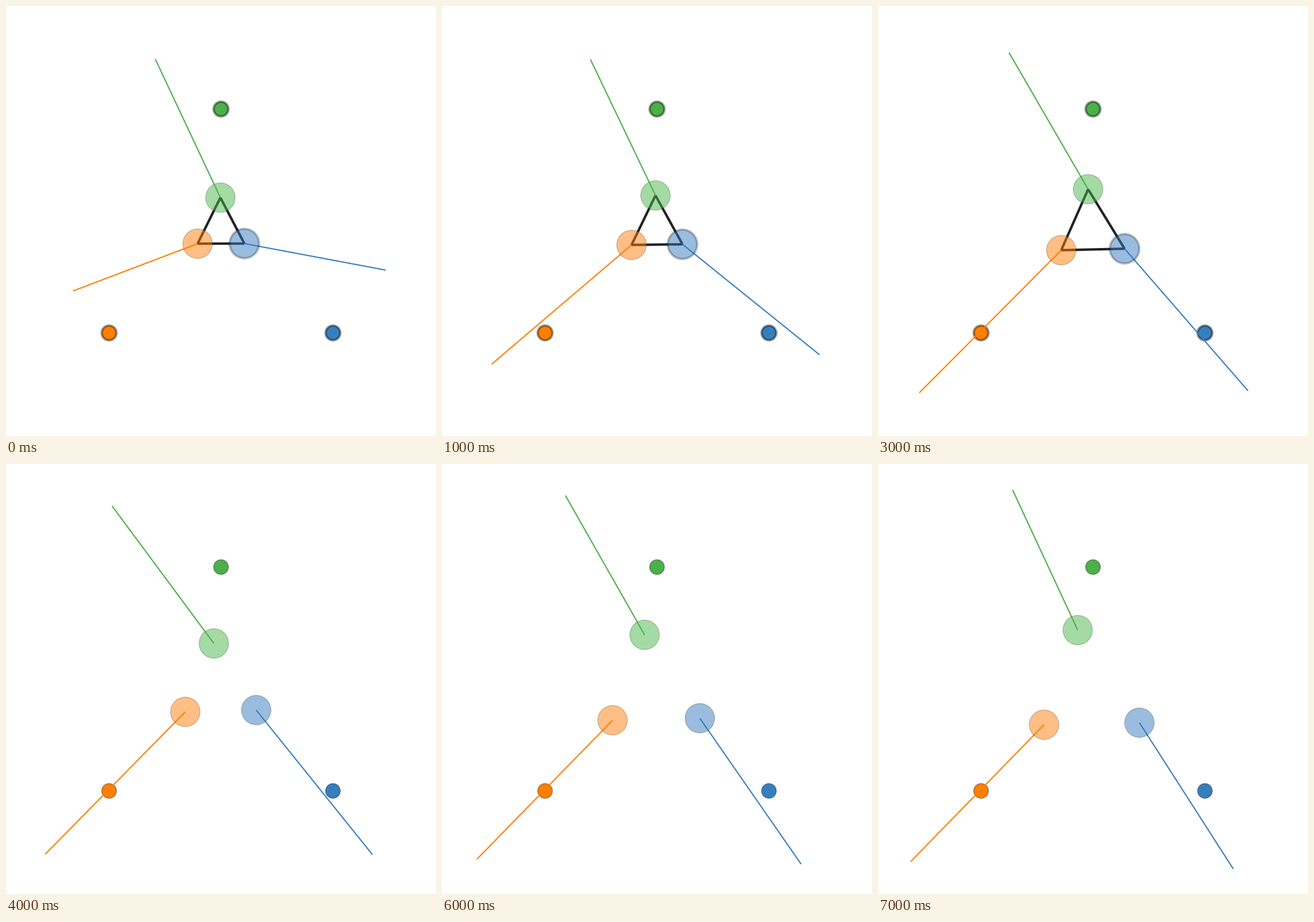
A matplotlib script for the animation above (8 s loop, 700 by 700 pixels).

```python
import matplotlib.pyplot as plt
import numpy as np
from matplotlib.animation import FuncAnimation
from matplotlib.colors import to_rgba
from matplotlib.patches import Circle

SIZE = 700
PX = 0.72  # points per pixel at 100 dpi
STEPS = 8
PLAIN = {4, 6, 7}  # steps without the triangle and the bold rims

# Listed in the order green, orange, blue
COLORS = ["#4bb04a", "#ff7f00", "#377ebf"]
LIGHT = ["#4ab74a", "#ff7f0a", "#377abf"]
TARGETS = [(350, 167.8), (167.8, 532.2), (532.2, 532.2)]

# Agents follow a smooth cubic through four key positions
KEY_TIMES = [0, 2, 5, 7]
KEY_SPOTS = np.array([
    [(349, 311.9), (311.9, 386.9), (388, 386.7)],
    [(345.2, 303.8), (303.9, 392.6), (396, 390.8)],
    [(334.2, 285.3), (284.9, 410.1), (413.5, 406.9)],
    [(325.1, 270.4), (270.3, 424.4), (425.6, 421.1)],
])
PATH = np.polyfit(KEY_TIMES, KEY_SPOTS.reshape(4, 6), 3)

# Headings drift steadily after a quick initial swing
AIM = np.array([(-106, -218), (-243, 246), (237.5, 234)])
DRIFT = np.array([(0, -1.45), (3.7, -3.3), (-12.1, 0.6)])
SWING = np.array([(0, -7.5), (40.2, -169), (-7.5, -190.8)])


def positions(t):
    return (t ** np.arange(3, -1, -1) @ PATH).reshape(3, 2)


def headings(t):
    aim = AIM + DRIFT * t + SWING * np.exp(-1.25 * t)
    # the green agent veers left for a while and comes back
    aim[0, 0] -= 66 * np.sin(np.pi * max(t - 2, 0) / 5) ** 2
    return aim


fig = plt.figure(figsize=(7, 7), dpi=100, facecolor="white")
ax = fig.add_axes([0, 0, 1, 1])
ax.set_xlim(0, SIZE)
ax.set_ylim(SIZE, 0)
ax.axis("off")


def disc(center, radius, fill, alpha, z):
    patch = Circle(center, radius, facecolor=to_rgba(fill, alpha), zorder=z)
    return ax.add_patch(patch)


def segment(color, width, z):
    return ax.plot([], [], color=color, lw=width * PX, zorder=z,
                   solid_capstyle="butt")[0]


def rim(patch, width, alpha):
    patch.set_linewidth(width * PX)
    patch.set_edgecolor((0, 0, 0, alpha))


dots = [disc(p, 12, c, 1, 1) for p, c in zip(TARGETS, COLORS)]
paths = [segment(c, 2, 2) for c in COLORS]
sides = [segment("#222222", 4, 3) for _ in COLORS]
agents = [disc((0, 0), 24, c, 0.5, 4) for c in LIGHT]


def draw(step):
    bold = step not in PLAIN
    spots = positions(step)
    tips = spots + headings(step)
    for i, spot in enumerate(spots):
        paths[i].set_data(*zip(spot, tips[i]))
        sides[i].set_data(*zip(spot, spots[(i + 1) % 3]))
        sides[i].set_visible(bold)
        agents[i].center = spot
        rim(dots[i], 3.8 if bold else 1.2, 0.4)
        rim(agents[i], 3.8 if bold and i == 2 else 1.2, 0.23)
    return dots + paths + sides + agents


anim = FuncAnimation(fig, draw, frames=STEPS, interval=1000,
                     repeat=True, repeat_delay=0)
plt.show()
```
